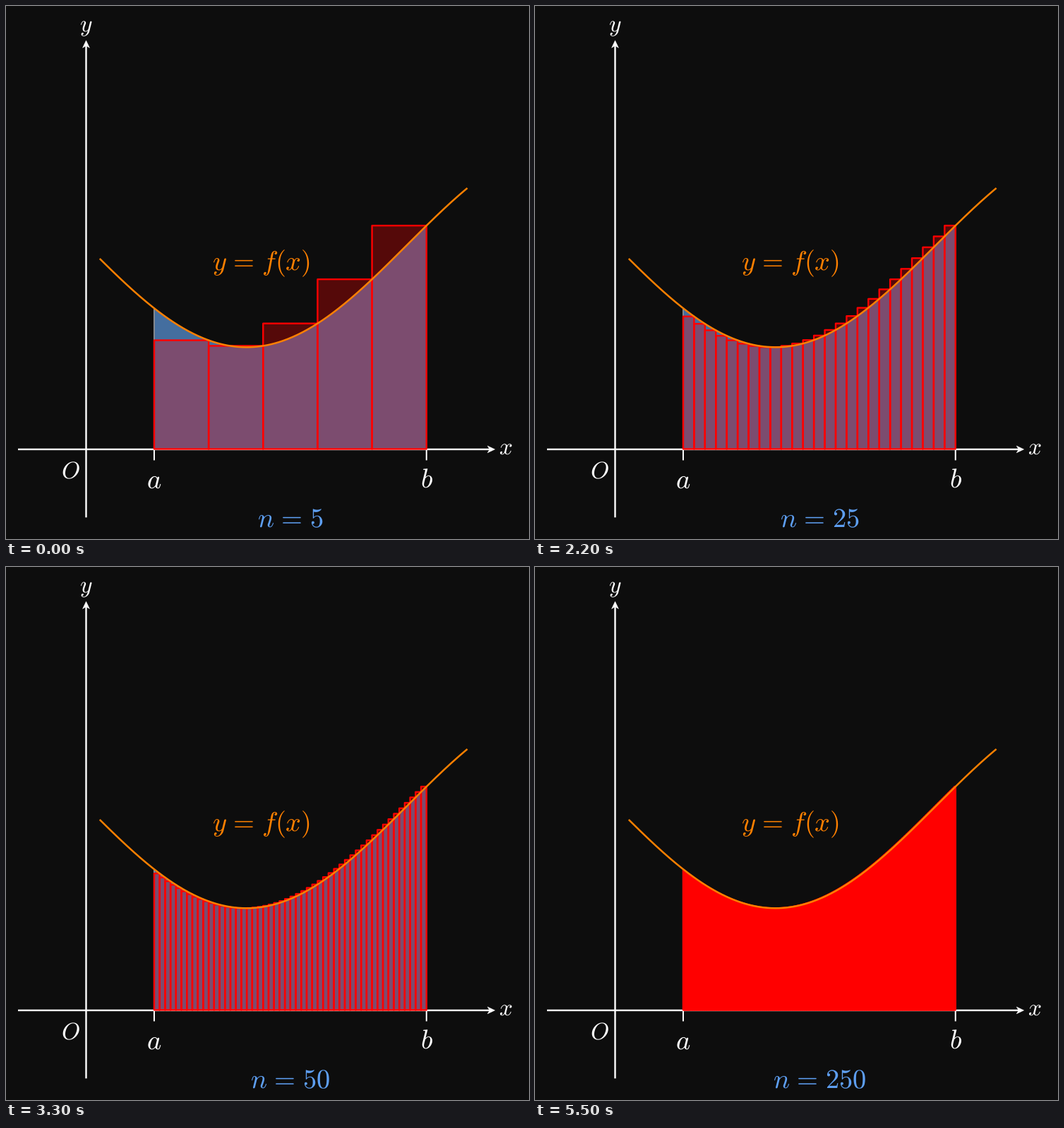
A matplotlib script that plays this animation: 741 px wide and 755 px high, repeating every 6600 ms.

```python
import numpy as np
import matplotlib.pyplot as plt
from matplotlib.animation import FuncAnimation
from matplotlib.patches import Polygon, Rectangle

W, H, DPI = 741, 755, 100
PX = 72 / DPI                      # one pixel in points
OX, OY, UNIT = 113.5, 628, 96.45   # origin and scale of the graph
A, B = 1, 5
COUNTS = [5, 10, 25, 50, 100, 250]

BG = "#0d0d0d"
WHITE = "#ffffff"
ORANGE = "#ff8000"
RED = "#ff0000"
AREA = "#446e9f"
BLUE = "#5e9ff2"

plt.rcParams["mathtext.fontset"] = "cm"
plt.rcParams["text.hinting"] = "none"


def f(x):
    return 3 - 1.5 * np.sin(2 * x / 3)


def sx(x):
    return OX + UNIT * x


def sy(y):
    return OY - UNIT * y


fig = plt.figure(figsize=(W / DPI, H / DPI), dpi=DPI, facecolor=BG)
ax = fig.add_axes([0, 0, 1, 1])
ax.set_xlim(0, W)
ax.set_ylim(H, 0)
ax.axis("off")


def line(x, y, color, width, z, **kw):
    ax.plot(x, y, color=color, lw=width * PX, zorder=z, snap=False,
            solid_capstyle="butt", solid_joinstyle="round", **kw)


def label(x, y, text, size, color=WHITE):
    return ax.text(x, y, text, fontsize=size * PX, color=color,
                   ha="center", va="baseline", zorder=8)


def arrow(tip, along):
    """Swept-back arrowhead pointing in the unit direction `along`."""
    dx, dy = along
    shape = [(0, 0), (-10.5, 5), (-7.5, 0), (-10.5, -5)]
    pts = [(tip[0] + u * dx - v * dy, tip[1] + u * dy + v * dx)
           for u, v in shape]
    ax.add_patch(Polygon(pts, fc=WHITE, ec=WHITE, lw=0.4 * PX,
                         joinstyle="round", zorder=2))


def equation(left, right):
    gap = r"\hspace{0.117}"
    return f"${left}{gap}={gap}{right}$"


# area under the curve
xs = np.linspace(A, B, 200)
area = [(sx(A), OY), *zip(sx(xs), sy(f(xs))), (sx(B), OY)]
ax.add_patch(Polygon(area, fc=AREA, ec="none", zorder=1))
for end in (A, B):
    line([sx(end)] * 2, [OY, sy(f(end))], "#85898e", 2, 1.5)

# axes and ticks
line([sx(-1), sx(6) - 6], [OY, OY], WHITE, 2.4, 2)
line([OX, OX], [sy(-1), sy(6) + 6], WHITE, 2.4, 2)
arrow((sx(6) + 0.5, OY), (1, 0))
arrow((OX, sy(6) - 0.5), (0, -1))
for end in (A, B):
    line([sx(end)] * 2, [OY, OY + 15.5], WHITE, 2, 2)

# curve
xs = np.linspace(0.2, 5.6, 300)
line(sx(xs), sy(f(xs)), ORANGE, 2.5, 6)

label(113, 36, "$y$", 33.5)
label(707.5, 636, "$x$", 33.5)
label(91, 669, "$O$", 33.5)
label(210, 683, "$a$", 38.5)
label(596, 683, "$b$", 38.5)
label(361.5, 374, equation("y", "f(x)"), 38.5, ORANGE)
count = label(403, 738, "", 38.5, BLUE)

bars = []


def draw(i):
    while bars:
        bars.pop().remove()
    n = COUNTS[i]
    step = (B - A) / n
    for k in range(n):
        x = A + k * step
        height = UNIT * f(x + step)
        bar = Rectangle((sx(x), OY - 0.5), UNIT * step, 0.5 - height,
                        fc=(1, 0, 0, 0.3), ec=RED, lw=2.4 * PX,
                        joinstyle="round", snap=False, zorder=4)
        bars.append(ax.add_patch(bar))
    count.set_text(equation("n", n))
    return [*bars, count]


anim = FuncAnimation(fig, draw, frames=len(COUNTS), init_func=lambda: [],
                     interval=1100, repeat=True, repeat_delay=0)
plt.show()
```
